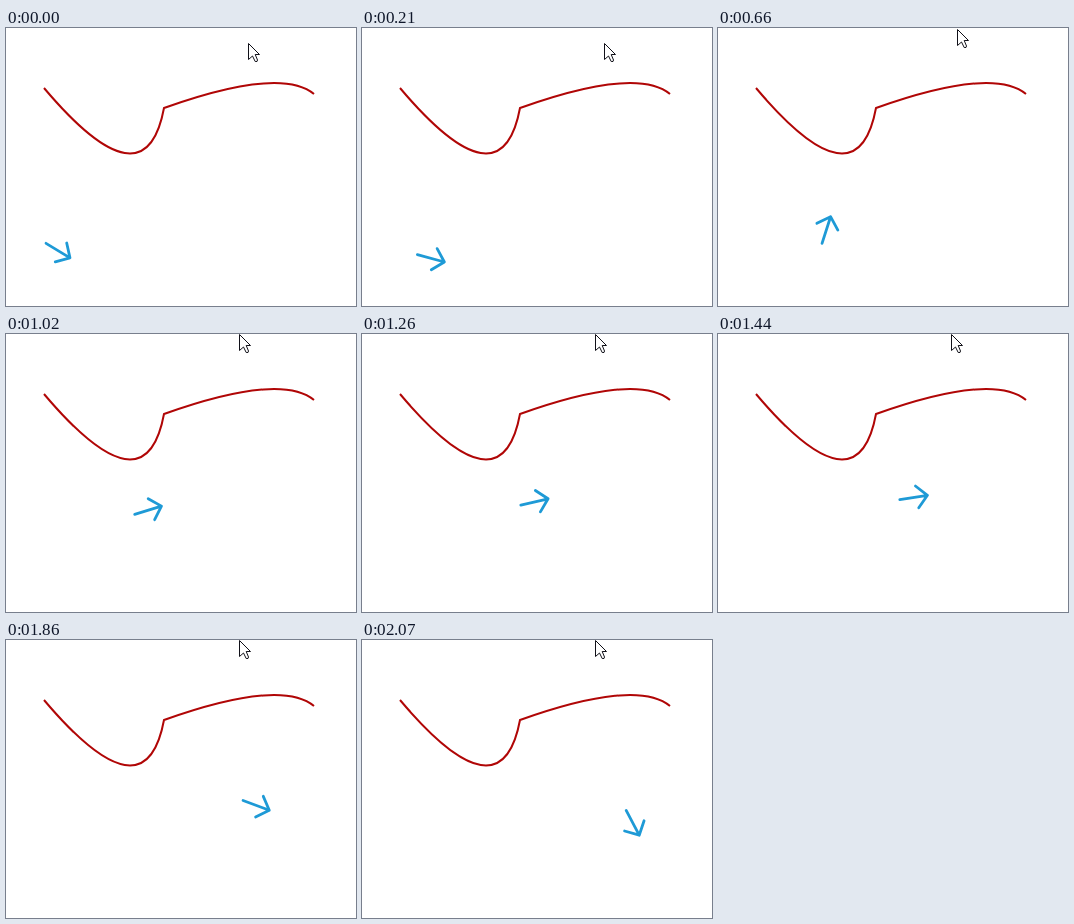
Recreate the animation shown at these times as an HTML page. Size 350 by 278 pixels, loop 2.1 s.

```html
<!DOCTYPE html>
<html lang="en">
<head>
<meta charset="utf-8">
<title>Arrow along a path</title>
<style>
  html, body { margin: 0; height: 100%; overflow: hidden; background: #fff; }
  svg { display: block; width: 350px; height: 278px; }
</style>
</head>
<body>
<svg viewBox="0 0 350 278" fill="none">
  <path d="M38 60Q139.4 180 158 80Q274.6 38.4 308 66" stroke="#b00606" stroke-width="2"/>
  <path id="arrow" d="M-14 0H14M3.5 -11L14 0L3.5 11" stroke="#1e9ad6" stroke-width="2.8"
        stroke-linecap="round" stroke-linejoin="round"/>
  <path id="cursor" d="M0 0V16L4 12.5L6.7 18H8.5L9 16.5L6.7 11H11Z" fill="#fff" stroke="#101018"/>
  <!-- invisible tracks: two legs for the arrow, one for the cursor -->
  <path id="dip" d="M52 222.6Q100 251.9 112.2 186.2"/>
  <path id="arch" d="M112.2 186.2Q247.5 137.9 270.7 182.8"/>
  <path id="drift" d="M242 15Q245.5 -.5 233 0"/>
</svg>
<script>
const LOOP = 2100, STEP = 30, CORNER = 780, END = LOOP - STEP;
const $ = id => document.getElementById(id);
const progress = (t, from, to) => Math.min(1, Math.max(0, (t - from) / (to - from)));

// Point and heading (degrees) at a fraction of a track's length
function along(track, k) {
  const s = k * track.getTotalLength();
  const p = track.getPointAtLength(s);
  const a = track.getPointAtLength(s - .5), b = track.getPointAtLength(s + .5);
  return { x: p.x, y: p.y, angle: Math.atan2(b.y - a.y, b.x - a.x) * 180 / Math.PI };
}

function draw(t) {
  const arrow = t < CORNER
    ? along($("dip"), progress(t, 0, CORNER) ** 1.2)
    : along($("arch"), progress(t, CORNER, END));
  $("arrow").setAttribute("transform", `translate(${arrow.x} ${arrow.y}) rotate(${arrow.angle})`);

  // the cursor sits on whole pixels
  const { x, y } = along($("drift"), progress(t, 450, 750));
  $("cursor").setAttribute("transform", `translate(${Math.round(x) + .5} ${Math.round(y) + .5})`);
}

const start = performance.now();
function tick() {
  const t = (performance.now() - start) % LOOP;
  draw(Math.floor(t / STEP) * STEP);
  requestAnimationFrame(tick);
}
tick();
</script>
</body>
</html>
```
